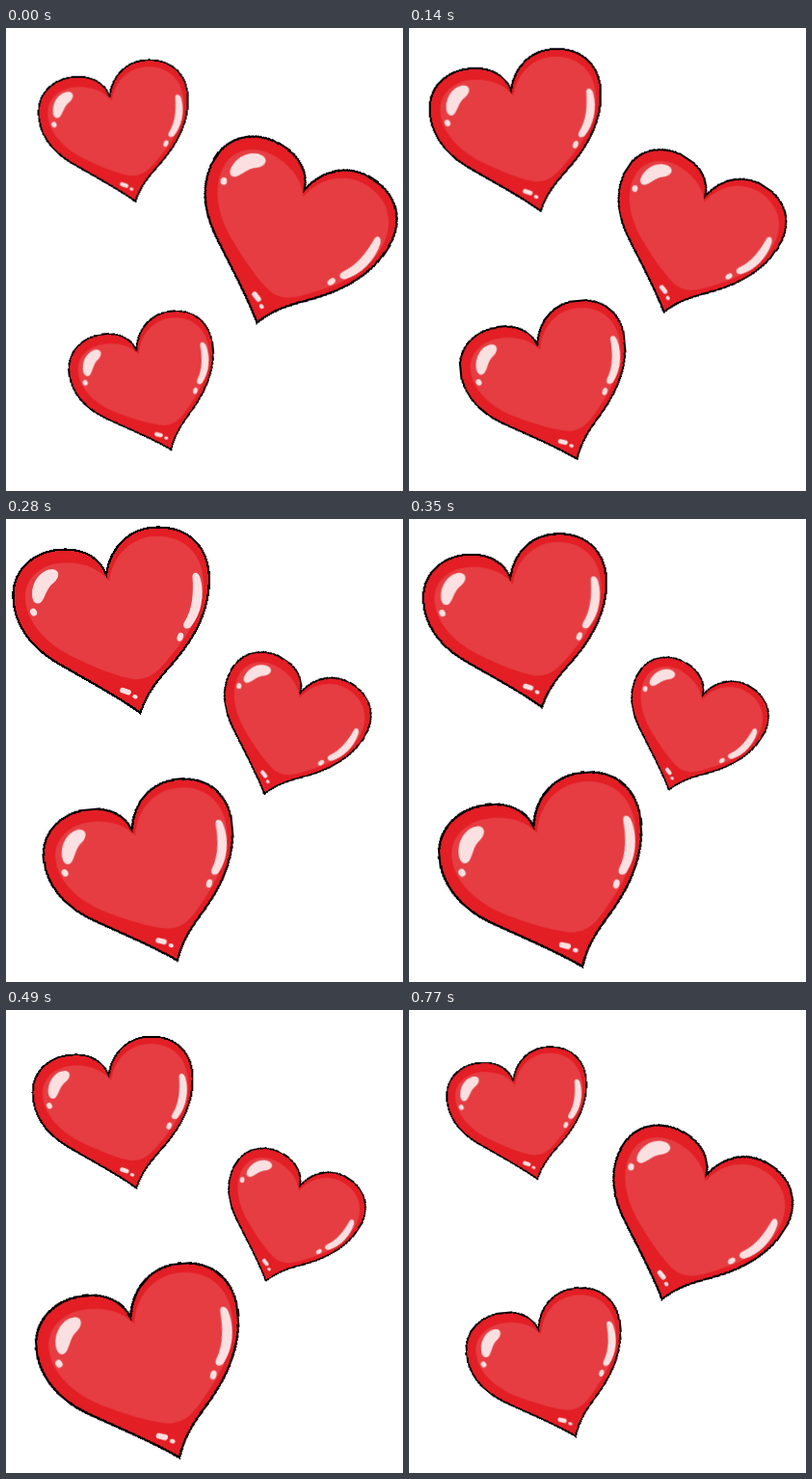
Recreate the animation shown at these times as an HTML page. Size 412 by 480 pixels, loop 0.84 s.

```html
<!DOCTYPE html>
<html lang="en">
<head>
<meta charset="utf-8">
<title>Beating hearts</title>
<style>
  html, body { margin: 0; width: 100%; height: 100%; overflow: hidden; background: #fff; }
  svg { display: block; width: 412px; height: 480px; }
</style>
</head>
<body>
<svg id="stage" viewBox="0 0 412 480" xmlns="http://www.w3.org/2000/svg">
  <defs>
    <g id="heart">
      <path fill="#e31e25" stroke="#000" stroke-width="2.3" shape-rendering="crispEdges" d="M104 57C97 39.5 80 31.4 62 31.4C30 31.4 7.3 51.5 7.4 80C8 108 24.5 131 50 147C80 165 114 182 139.3 200.8C147 178 159 165 175 147C193 126 210.9 97 210.9 63C210.9 29 190 8.4 158 8.4C129 8.4 108.5 28 104 57Z"/>
      <path fill="#e53d42" d="M107 64C111 36 132 17.5 157 17.5C185 17.5 204 36 205 65C205 94 191 118 174 138C160 155 152 166 134 166C116 164 86 151 66 141C40 127 21 106 20 82C19 60 38 45 62 45C84 45 98 53 107 64Z"/>
      <g fill="#fae0e1">
        <g transform="translate(0.6 0.7)">
          <path d="M48 51C56 52 55 60 49 65C41 71 41 79 36 85C32 89 26 86 26.5 76C27 62 37 51 48 51Z"/>
          <ellipse cx="28" cy="95.7" rx="3.4" ry="4" transform="rotate(-25 28 95.7)"/>
          <path d="M193 60C192 53 199 53 201 60C206 78 202 98 191 111C186 115 181 111 185 105C193 92 194 76 193 60Z"/>
          <ellipse cx="180.2" cy="121.3" rx="3.1" ry="4.6" transform="rotate(20 180.2 121.3)"/>
        </g>
        <rect x="118" y="175.6" width="12" height="5.6" rx="2.8" transform="rotate(18 124 178.4)"/>
        <ellipse cx="134" cy="184" rx="2.7" ry="2.1" transform="rotate(18 134 184)"/>
      </g>
    </g>
  </defs>
</svg>
<script>
const STEPS = 12, STEP_MS = 70, RATIO = 1.07;

// centre: fixed point of the beat; notch, size, turn: pose at full size; peak: step of full size
const hearts = [
  { centre: [118, 111.5], notch: [104, 53.2], size: 1, turn: 0, peak: 4 },
  { centre: [292.6, 219.5], notch: [312, 164.1], size: 0.99, turn: 33.5, peak: 0 },
  { centre: [150, 370.3], notch: [127.4, 310.4], size: 1.114, turn: -5.4, peak: 6 }
];

const svgEl = (name, attrs) => {
  const el = document.createElementNS('http://www.w3.org/2000/svg', name);
  for (const key in attrs) el.setAttribute(key, attrs[key]);
  return el;
};

const scaleAt = (step, peak) => {
  const d = Math.abs(step - peak) % STEPS;
  return RATIO ** -Math.min(d, STEPS - d);
};

for (const { centre, notch, size, turn, peak } of hearts) {
  const beat = svgEl('g', {});
  beat.style.transformOrigin = `${centre[0]}px ${centre[1]}px`;
  beat.append(svgEl('use', {
    href: '#heart',
    transform: `translate(${notch}) rotate(${turn}) scale(${size}) translate(-104 -53)`
  }));
  document.getElementById('stage').append(beat);

  const frames = Array.from({ length: STEPS + 1 }, (_, i) => ({
    transform: `scale(${scaleAt(i, peak)})`,
    offset: i / STEPS,
    easing: 'steps(1, end)'
  }));
  beat.animate(frames, { duration: STEPS * STEP_MS, iterations: Infinity });
}
</script>
</body>
</html>
```
